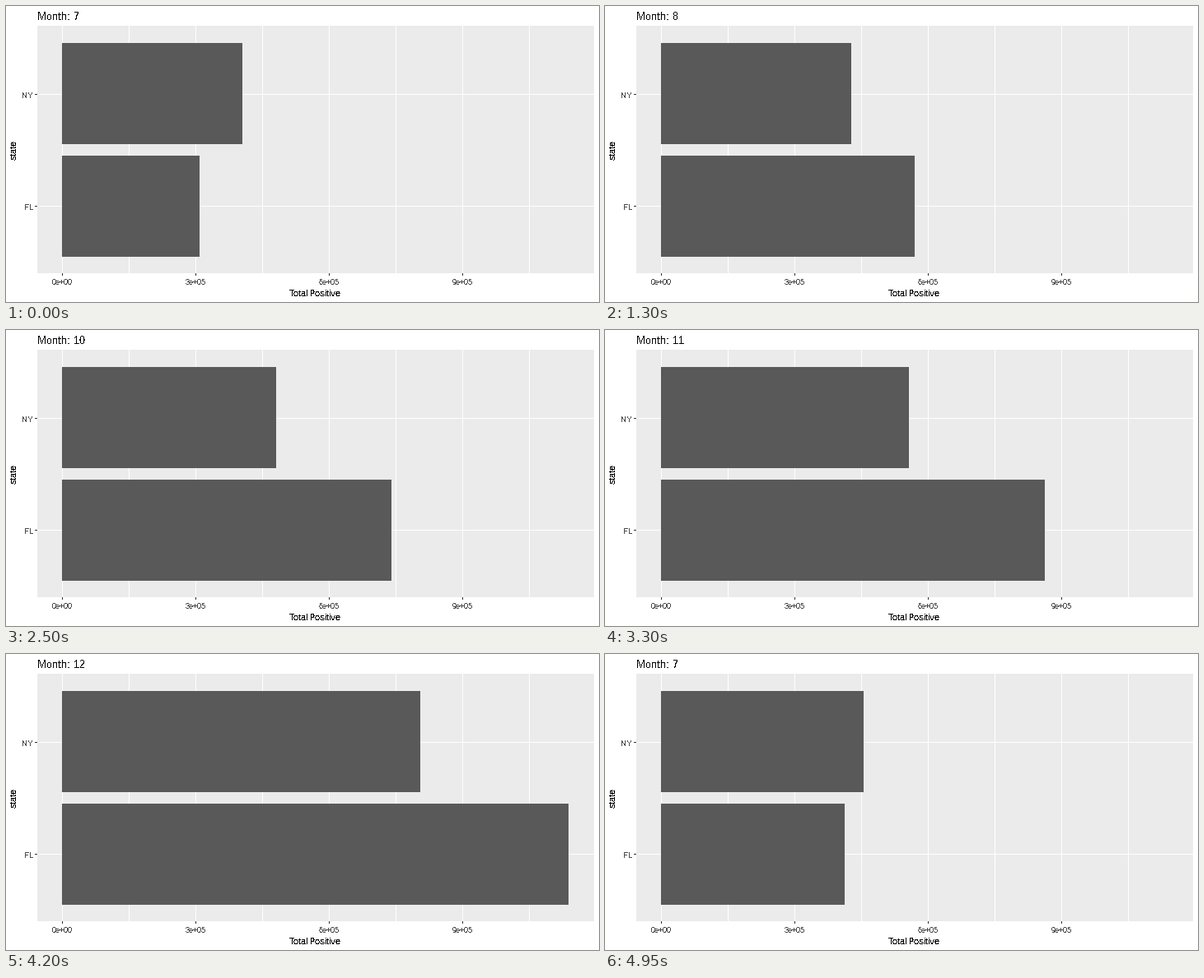
These frames come from a looping animation (720 px wide and 360 px high, 5000 ms). A matplotlib script:

```python
import matplotlib as mpl
import matplotlib.pyplot as plt
from matplotlib.animation import FuncAnimation
from matplotlib.patches import Rectangle

W, H = 720, 360
FRAMES, INTERVAL, STEPS = 100, 50, 8

mpl.rcParams.update({
    "font.family": "Liberation Sans",
    "text.hinting": "native",
    "text.hinting_factor": 1,
    "toolbar": "None",
})

MONTHS = [7, 8, 9, 10, 11, 12]
NY = [287, 298, 309, 328, 375, 503]   # right edge of each bar, px
FL = [235, 369, 426, 468, 544, 683]
HOLD_END = [8, 25, 42, 59, 76, 92]    # last still frame of each month

X0, STEP_X = 68, 162
LEFT, TOP, RIGHT, BOTTOM = 38, 24, 714, 325
ROWS = {"NY": 107, "FL": 243}

fig = plt.figure(figsize=(W / 72, H / 72), dpi=72, facecolor="white")
ax = fig.add_axes([0, 0, 1, 1])
ax.set_xlim(0, W)
ax.set_ylim(H, 0)
ax.axis("off")


def box(x, y, w, h, color, z=1):
    patch = Rectangle((x, y), w, h, facecolor=color, linewidth=0,
                      antialiased=False, zorder=z)
    return ax.add_patch(patch)


def label(x, y, text, size, color="black", ha="left", **kw):
    return ax.text(x, y, text, fontsize=size, color=color, ha=ha,
                   va=kw.pop("va", "baseline"), antialiased=False, **kw)


# Panel, grid, ticks
box(LEFT, TOP, RIGHT - LEFT, BOTTOM - TOP, "#EBEBEB")
for i in range(8):
    box(X0 + i * STEP_X // 2, TOP, 1, BOTTOM - TOP, "white", 2)
for name, y in ROWS.items():
    box(LEFT, y, RIGHT - LEFT, 1, "white", 2)
    box(LEFT - 3, y, 3, 1, "#333333")
    label(33, y + 5, name, 9, "#4D4D4D", "right")
for i in range(4):
    x = X0 + i * STEP_X
    box(x, BOTTOM, 1, 3, "#333333")
    label(x, 339, "0e+00" if i == 0 else f"{3 * i}e+05", 9, "#4D4D4D", "center")

label(375.5, 353, "Total Positive", 11, ha="center")
label(15, 175, "state", 11, ha="right", va="center", rotation=90)
title = label(38, 17, "", 13)

bar_ny = box(X0, 45, 0, 123, "#595959", 3)
bar_fl = box(X0, 182, 0, 123, "#595959", 3)


def draw(frame):
    i = max((j for j, end in enumerate(HOLD_END) if frame > end), default=-1)
    if i < 0:
        i, k = 0, 0
    else:
        k = min(frame - HOLD_END[i], STEPS)
    nxt = (i + 1) % len(MONTHS)
    t = k / STEPS
    for bar, ends in ((bar_ny, NY), (bar_fl, FL)):
        bar.set_width(round(ends[i] + (ends[nxt] - ends[i]) * t) - X0)
    title.set_text(f"Month: {MONTHS[nxt if t > 0.5 else i]}")
    return bar_ny, bar_fl, title


anim = FuncAnimation(fig, draw, frames=FRAMES, interval=INTERVAL,
                     init_func=lambda: draw(0), repeat=True, repeat_delay=0)
plt.show()
```
